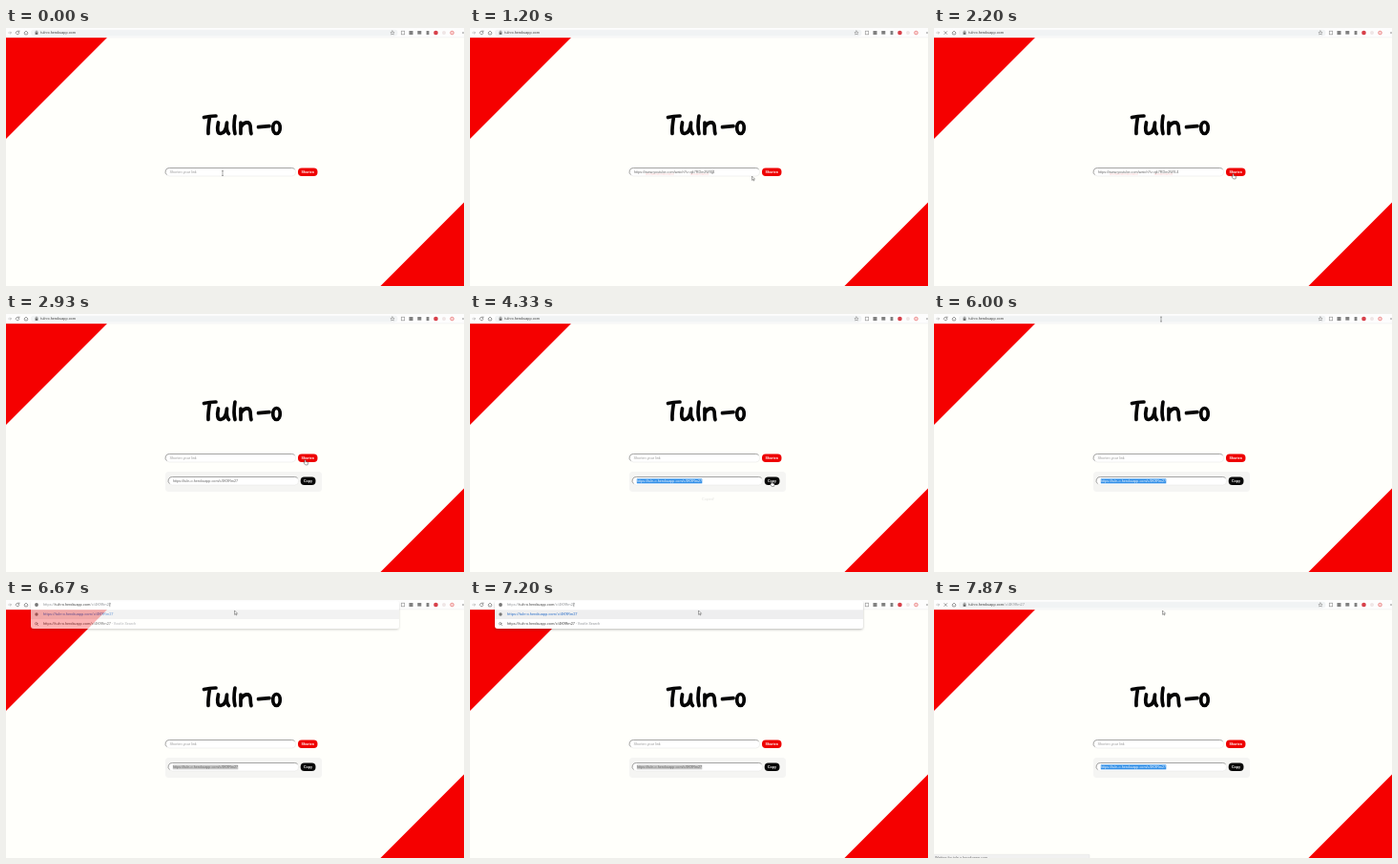
Animation, 480 px wide and 270 px high, one loop 8 s. Source, as an HTML page:

```html
<!DOCTYPE html>
<html lang="en">
<head>
<meta charset="utf-8">
<title>Tuln-o</title>
<style>
  html, body { margin: 0; width: 100%; height: 100%; overflow: hidden; background: #fffffb; }
  svg { display: block; width: 100vw; height: 100vh; }
  text { font: 3.75px "Liberation Sans", Arial, sans-serif; fill: #666; white-space: pre; }
  .bar text { font-family: Roboto, sans-serif; font-size: 3.8px; fill: #444; }
  .bar .dim { fill: #94979b; }
  .bar .link { fill: #2a6fc9; font-size: 3.95px; }
  .btn { font-weight: bold; font-size: 3.6px; fill: #fff; text-anchor: middle; }
  .line { fill: none; stroke: #666; stroke-width: .6; stroke-linecap: round; }
  .hint { fill: #999; }
</style>
</head>
<body>
<svg viewBox="0 0 480 270">
  <defs>
    <g id="field">
      <rect x=".4" y=".4" width="136.2" height="8.6" rx="4" fill="#fff" stroke="#e2e2e0" stroke-width=".5"/>
      <path d="M1.5 7.6A4 4 0 0 1 4.4.5H132.6A4 4 0 0 1 135.6 1.8" fill="none" stroke="#858585" stroke-width=".7"/>
    </g>
    <filter id="shadow" x="-5%" y="-20%" width="110%" height="160%">
      <feDropShadow dx="0" dy="1.2" stdDeviation="1.2" flood-opacity=".25"/>
    </filter>
  </defs>

  <rect width="480" height="270" fill="#fffffb"/>
  <path d="M0 10H106L0 116ZM480 182.500V270H392.500Z" fill="#f50000"/>

  <!-- hand-lettered title -->
  <g role="img" aria-label="Tuln-o" fill="none" stroke="#050505" stroke-width="3.7" stroke-linecap="round" stroke-linejoin="round">
    <path d="M207.5 93.5C212 92.3 216 92 220 92M213.5 93C212.5 99 211.500 105 212 110.500"/>
    <path d="M222.500 99C221 106 221.500 110.500 225 110.500C229 110 231 105 231.500 99C231 104 231 108 233.500 110.500"/>
    <path d="M240 92C239 98 238.500 105 240 110.500"/>
    <path d="M246 99V110.500M246 104C249 98 255 97 256 102C256.500 105 256 108 257 110.500"/>
    <path d="M264.500 103.700L276 102.600"/>
    <path d="M283.500 98.500C278.500 98.500 278.500 110.500 283.500 110.500C288.500 110.500 288.500 98.500 283.500 98.500"/>
  </g>

  <!-- link form -->
  <use href="#field" x="167" y="146"/>
  <text id="hint" class="hint" x="171.500" y="152">Shorten your link</text>
  <g id="pasted">
    <text x="172" y="152">https://www.youtube.com/watch?v=qk7RDm2W9-4</text>
    <path d="M184 153H214M231 153H250" stroke="#f77" stroke-width=".4" stroke-dasharray=".8 .4"/>
  </g>
  <path id="caret" d="M0 148.500V153" stroke="#444" stroke-width=".5"/>
  <rect x="306" y="146.500" width="20.500" height="8.500" rx="4" fill="#ee0000"/>
  <text class="btn" x="316.200" y="152">Shorten</text>

  <!-- result -->
  <g id="result">
    <rect x="167" y="165" width="164" height="21" rx="3.500" fill="#f5f5f3"/>
    <use href="#field" x="170" y="170"/>
    <rect id="mark" x="174.800" y="172.400" width="68.500" height="4.900"/>
    <text id="short" x="175" y="176">https://tuln-o.herokuapp.com/c/4K9Rm27</text>
    <rect x="308.700" y="170.500" width="15.800" height="8.500" rx="4" fill="#080808"/>
    <text class="btn" x="316.500" y="176">Copy</text>
  </g>
  <text id="toast" x="249.500" y="195" text-anchor="middle">Copied!</text>

  <!-- browser bar -->
  <g class="bar">
    <rect width="480" height="10" fill="#fdfdfd"/>
    <path d="M0 9.900H480" stroke="#e2e2e2" stroke-width=".4"/>
    <rect x="26" y="1.800" width="384.500" height="6.600" rx="3.300" fill="#f1f3f4"/>
    <path class="line" stroke-opacity=".5" d="M2.500 5H5.500M4.300 3.800L5.500 5L4.300 6.200"/>
    <path id="reload" class="line" d="M13.600 3.900A1.800 1.800 0 1 0 13.900 5.500M13.900 2.900V4.200H12.600"/>
    <path id="stop" class="line" d="M10.800 3.600L13.600 6.400M13.600 3.600L10.800 6.400"/>
    <path class="line" d="M19 5L21 3L23 5M19.700 5V6.900H22.300V5"/>
    <path id="star" class="line" style="stroke-width:.4" d="M405 2.900L405.600 4.400L407.100 4.500L406 5.500L406.300 7L405 6.200L403.700 7L404 5.500L402.900 4.500L404.400 4.400Z"/>
    <g fill="#808080">
      <rect x="414.300" y="3.200" width="3.400" height="3.600" fill="#fff" stroke="#999" stroke-width=".7"/>
      <rect x="422.500" y="3" width="4" height="4"/>
      <rect x="431.300" y="3" width="4" height="3.600"/>
      <rect x="440.600" y="3" width="2.800" height="4"/>
      <circle cx="450.500" cy="5" r="2.300" fill="#d8404a"/>
      <circle cx="459" cy="5" r="2" fill="#efe6e6"/>
      <circle cx="467.500" cy="5" r="1.800" fill="#fbdada" stroke="#e56a6a" stroke-width=".7"/>
      <circle cx="479" cy="5" r=".8"/>
    </g>
    <path d="M30.600 4.600H33.400V6.800H30.600Z" fill="#666"/>
    <path class="line" d="M31.100 4.600V3.900A.9 .9 0 0 1 32.900 3.900V4.600"/>
    <rect id="pick" x="35.700" y="2.900" width="38" height="4.600" fill="#3390ff"/>
    <text id="url" x="36.200" y="6.300">tuln-o.herokuapp.com<tspan id="path" class="dim">/c/4K9Rm27</tspan></text>
    <rect id="ring" x="26.300" y="1.600" width="384" height="7" rx="3.500" fill="none" stroke="#4a8df0" stroke-width=".7"/>
    <g id="menu">
      <rect x="26" y=".8" width="386" height="29.200" rx="3" fill="#fff" filter="url(#shadow)"/>
      <rect x="26" y="10.300" width="386" height="9.700" fill="#eeeeef"/>
      <circle cx="32" cy="15" r="1.700" fill="#777"/>
      <circle class="line" cx="31.700" cy="24.700" r="1.200"/>
      <path class="line" d="M32.600 25.600L33.600 26.600"/>
      <text class="link" x="39" y="16.300">https://tuln-o.herokuapp.com/c/4K9Rm27</text>
      <text x="39" y="26.300">https://tuln-o.herokuapp.com/c/4K9Rm27<tspan class="dim"> - Vostle Search</tspan></text>
    </g>
    <g id="entry">
      <rect x="26.500" y="1.200" width="385" height="8.800" rx="2.500" fill="#fff"/>
      <circle cx="32" cy="5" r="1.900" fill="#777"/>
      <text x="39" y="6.300"><tspan class="dim">https://</tspan>tuln-o.herokuapp.com<tspan class="dim">/c/4K9Rm27</tspan></text>
      <path d="M108.800 2.800V7.200" stroke="#444" stroke-width=".4"/>
    </g>
  </g>

  <g id="status">
    <rect x="-2" y="266.300" width="165" height="6" rx="1" fill="#f1f1f1" stroke="#ddd" stroke-width=".4"/>
    <text x="1" y="270.800">Waiting for tuln-o.herokuapp.com...</text>
  </g>

  <g id="cursor" stroke-linejoin="round">
    <path id="beam" d="M-1-2.400H1M0-2.400V2.400M-1 2.400H1" fill="none" stroke="#555" stroke-width=".5"/>
    <path id="arrow" d="M0 0V4.300L1 3.400L1.700 5L2.400 4.700L1.700 3.200H3.100Z" fill="#fff" stroke="#444" stroke-width=".45"/>
    <path id="hand" d="M0 .4Q.6-.5 1.100.4V2L3.300 2.500Q3.800 2.700 3.600 3.500L3.100 5.400H.7L-1 3.300Q-.8 2.500 0 3.100Z" fill="#fff" stroke="#333" stroke-width=".45"/>
  </g>
</svg>
<script>
  const LOOP = 8000;
  const $ = id => document.getElementById(id);
  const show = (id, on) => $(id).style.display = on ? "" : "none";
  const ramp = (t, a, b) => Math.min(1, Math.max(0, (t - a) / (b - a)));
  const ease = p => p * p * (3 - 2 * p);

  // pointer moves: start, end, x, y
  const home = [227, 152];
  const moves = [
    [700, 1180, 295.5, 155], [1470, 1730, 313, 152.5],
    [3330, 4130, 315.5, 175], [5070, 5870, 238, 5.5],
    [6470, 6640, 239.5, 11]
  ];
  // pointer shapes: from time, shape
  const shapes = [
    [0, "beam"], [1130, "arrow"], [1600, "hand"], [3480, "arrow"],
    [3830, "hand"], [5170, "arrow"], [5800, "beam"], [6540, "arrow"]
  ];

  function pointer(t) {
    let [x, y] = home;
    for (const [a, b, toX, toY] of moves) {
      const p = ease(ramp(t, a, b));
      x += (toX - x) * p;
      y += (toY - y) * p;
    }
    $("cursor").setAttribute("transform", `translate(${x} ${y})`);
    const shape = shapes.filter(s => s[0] <= t).pop()[1];
    for (const id of ["beam", "arrow", "hand"]) show(id, id === shape);
  }

  function draw(t) {
    const within = (a, b) => t >= a && t < b;
    const pasted = within(600, 2530);
    const loading = within(2130, 2530) || t >= 7730;
    const focused = within(6130, 7670);
    const picked = within(6130, 6470);
    const typed = within(6470, 7670);
    const selected = t >= 4200;

    show("hint", !pasted);
    show("pasted", pasted);
    show("caret", within(200, 2070) && (t - 200) % 1060 < 530 || within(1130, 1470));
    $("caret").setAttribute("transform", `translate(${pasted ? 254 : 171.3} 0)`);

    show("result", t >= 2530);
    show("mark", selected);
    $("mark").style.fill = focused ? "#c8c8c8" : "#3390e8";
    $("short").style.fill = selected && !focused ? "#fff" : "";
    $("toast").style.opacity = .7 * ramp(t, 4200, 4700) * (1 - ramp(t, 5070, 5470));

    show("reload", !loading);
    show("stop", loading);
    show("star", !typed);
    show("ring", picked);
    show("pick", picked);
    $("url").style.fill = picked ? "#fff" : "";
    show("path", t >= 7670);
    show("entry", typed);
    show("menu", typed);
    $("menu").style.opacity = ramp(t, 6530, 6730);
    show("status", t >= 7800);
    pointer(t);
  }

  const start = performance.now();
  function tick() {
    draw((performance.now() - start) % LOOP);
    requestAnimationFrame(tick);
  }
  tick();
</script>
</body>
</html>
```
